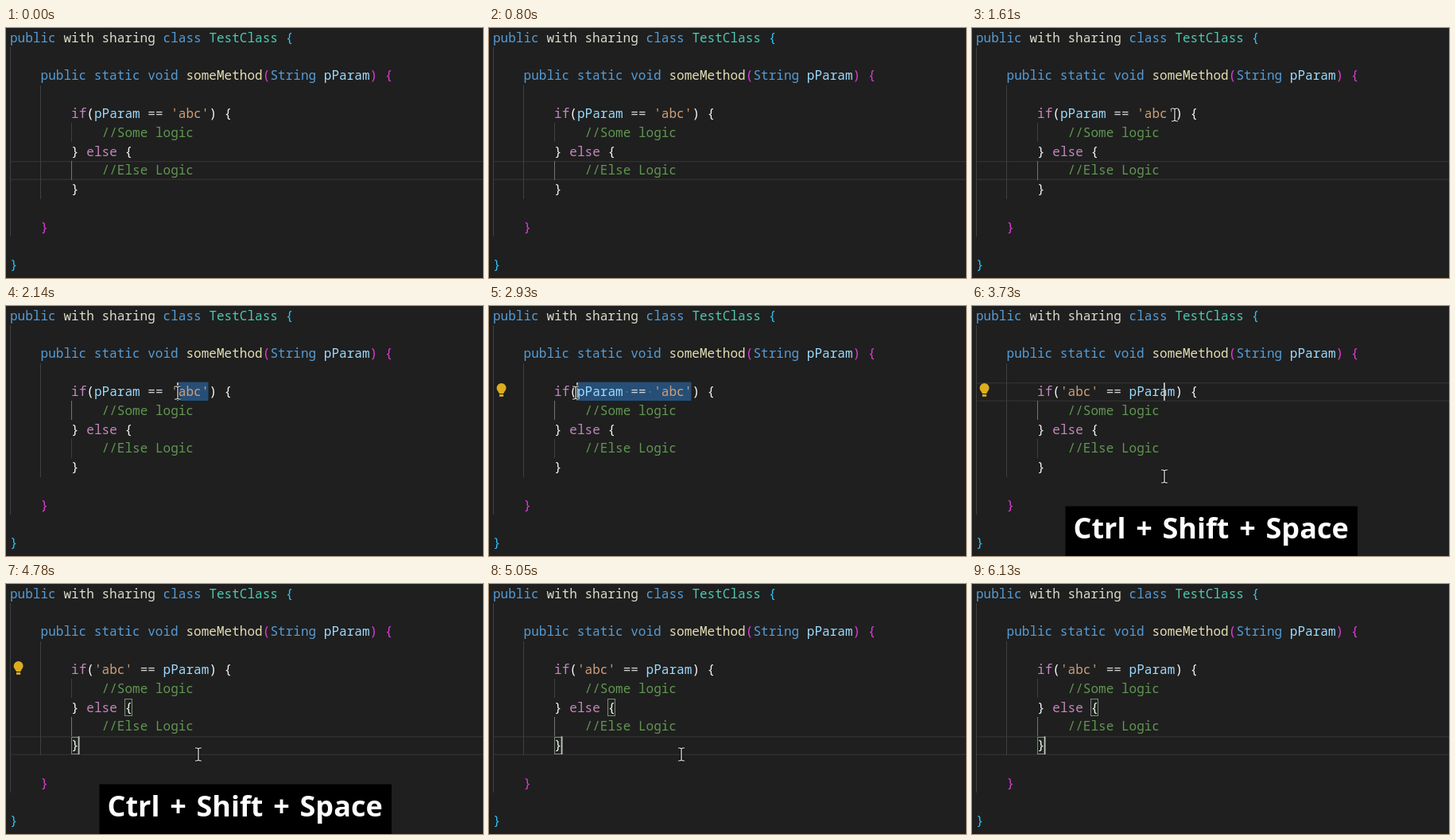
Animation, 600 px wide and 314 px high, one loop 6.33 s. Source, as an HTML page with a canvas:

```html
<!DOCTYPE html>
<html lang="en">
<head>
<meta charset="utf-8">
<title>Swapping a condition in an editor</title>
<style>
  html, body { margin: 0; width: 100%; height: 100%; overflow: hidden; background: #1f1f1f; }
  canvas { display: block; width: 600px; height: 314px; }
</style>
</head>
<body>
<canvas id="stage" width="600" height="314"></canvas>
<script>
const ctx = document.getElementById('stage').getContext('2d');

const LOOP = 6330;
const CHAR = 9.63, LEFT = 5;
const ROW = 23.8, TOP = 0.4, BASE = 17.4;
const CODE_FONT = '500 16.05px "Noto Sans Mono", "DejaVu Sans Mono", monospace';
const KEY_FONT = 'bold 36px "Open Sans", "Noto Sans", sans-serif';

const C = {
  bg: '#1f1f1f', key: '#569cd6', plain: '#dcdccc', type: '#4ec9b0', method: '#e2deb4',
  param: '#9cdcfe', text: '#ce9f78', note: '#5f9650', flow: '#c586c0', op: '#d4d4d4',
  outer: '#30c4f4', mid: '#e03cd8', inner: '#f6f6f6',
  guide: '#404040', guideOn: '#707570', line: '#2f2f2f', select: '#264f78'
};

// Each entry: row, column, then text and colour pairs.
const CODE = [
  [0, 0, 'public ', C.key, 'with sharing ', C.plain, 'class ', C.key, 'TestClass ', C.type, '{', C.outer],
  [2, 4, 'public static void ', C.key, 'someMethod', C.method, '(', C.mid, 'String ', C.key,
    'pParam', C.param, ') {', C.mid],
  [5, 12, '//Some logic', C.note],
  [6, 8, '} ', C.inner, 'else ', C.flow, '{', C.inner],
  [7, 12, '//Else Logic', C.note],
  [8, 8, '}', C.inner],
  [10, 4, '}', C.mid],
  [12, 0, '}', C.outer]
];
const BEFORE = ['pParam', C.param, ' == ', C.op, "'abc'", C.text];
const AFTER = ["'abc'", C.text, ' == ', C.op, 'pParam', C.param];

const PAREN = [[4, 10], [4, 26]];
const IF_BODY = [[4, 28], [6, 8]];
const ELSE_BODY = [[6, 15], [8, 8]];

// Full state changes; every step inherits the values it does not set.
const STEPS = [
  { at: 0, row: 7, active: 7, mouse: null, caret: null, sel: null, swapped: false,
    bulb: false, banner: false, boxes: [] },
  { at: 1340, mouse: [296, 140] },
  { at: 1610, mouse: [255, 109] },
  { at: 1870, row: 4, active: 5, caret: [4, 254.5] },
  { at: 2140, row: null, mouse: [216, 109], sel: [216, 254.5], caret: [4, 216] },
  { at: 2410, mouse: [148, 109], sel: [149, 254.5], caret: [4, 149] },
  { at: 2670, mouse: [109, 109], sel: [111, 254.5], caret: [4, 111] },
  { at: 2930, bulb: true },
  { at: 3200, swapped: true, mouse: [168, 128] },
  { at: 3460, row: 4, sel: null, mouse: [242, 176], caret: [4, 242] },
  { at: 3730, banner: true, mouse: [242, 214] },
  { at: 3990, caret: [4, colX(27)], boxes: PAREN },
  { at: 4260, caret: [4, colX(29)], boxes: IF_BODY },
  { at: 4520, row: 6, caret: [6, colX(9)], boxes: IF_BODY },
  { at: 4780, row: 8, active: 7, caret: [8, colX(9)], boxes: ELSE_BODY },
  { at: 5050, bulb: false, banner: false },
  { at: 5320, caret: null },
  { at: 5590, mouse: [498, 226] },
  { at: 5870, mouse: null, caret: [8, colX(9)] }
];

function colX(col) { return LEFT + col * CHAR; }
function rowY(row) { return TOP + row * ROW; }

function rect(x, y, w, h, color) {
  ctx.fillStyle = color;
  ctx.fillRect(x, y, w, h);
}

function write(row, col, parts) {
  for (let i = 0; i < parts.length; i += 2) {
    ctx.fillStyle = parts[i + 1];
    ctx.fillText(parts[i], colX(col), rowY(row) + BASE);
    col += parts[i].length;
  }
}

function stateAt(t) {
  return Object.assign({}, ...STEPS.filter(s => s.at <= t));
}

function guide(x, from, to, color) {
  const y = Math.round(rowY(from));
  rect(x, y, 1, Math.round(rowY(to)) - y, color);
}

function drawGuides(active) {
  guide(5, 1, 11, C.guide);
  guide(43, 3, 9, C.guide);
  for (const row of [5, 7]) guide(82, row, row + 1, row === active ? C.guideOn : C.guide);
}

function drawBox([row, col]) {
  ctx.strokeStyle = '#858585';
  ctx.lineWidth = 1;
  const x = Math.round(colX(col)) + 0.5, y = Math.round(rowY(row)) + 1.5;
  rect(x, y, 9, 21, 'rgba(0,100,0,.1)');
  ctx.strokeRect(x, y, 9, 21);
}

function drawBulb() {
  ctx.fillStyle = '#dcae1e';
  ctx.beginPath();
  ctx.arc(15.6, 103, 6, 0.8, Math.PI - 0.8, true);
  ctx.lineTo(13, 110);
  ctx.lineTo(18.2, 110);
  ctx.fill();
  rect(13, 111, 5.2, 2.8, '#dcae1e');
}

function drawMouse([x, y]) {
  const beam = new Path2D();
  for (const s of [-1, 1]) {
    beam.moveTo(x - 4, y + 8 * s);
    beam.lineTo(x - 1.5, y + 8 * s);
    beam.lineTo(x, y + 7 * s);
    beam.lineTo(x + 1.5, y + 8 * s);
    beam.lineTo(x + 4, y + 8 * s);
  }
  beam.moveTo(x, y - 7);
  beam.lineTo(x, y + 7);
  ctx.lineWidth = 3.2;
  ctx.strokeStyle = '#080808';
  ctx.stroke(beam);
  ctx.lineWidth = 1.2;
  ctx.strokeStyle = '#f2f2f2';
  ctx.stroke(beam);
}

function drawBanner() {
  rect(117.5, 251.5, 367.5, 62.5, '#000');
  ctx.font = KEY_FONT;
  ctx.wordSpacing = '3.4px';
  ctx.fillStyle = '#fff';
  ctx.fillText('Ctrl + Shift + Space', 127.5, 291.5);
  ctx.wordSpacing = '0px';
}

function drawSelection([from, to], parts) {
  rect(from, rowY(4), to - from, ROW - 0.4, C.select);
  let col = 11;
  for (const ch of parts.filter((_, i) => i % 2 === 0).join('')) {
    const x = colX(col++) + CHAR / 2;
    if (ch === ' ' && x > from) rect(x - 0.8, rowY(4) + 11.5, 1.6, 1.6, '#5f7a92');
  }
}

function draw(t) {
  const s = stateAt(t);
  const condition = s.swapped ? AFTER : BEFORE;
  rect(0, 0, 600, 314, C.bg);
  if (s.row !== null) {
    const y = Math.round(rowY(s.row));
    rect(6, y, 594, 1.5, C.line);
    rect(6, y + 22.5, 594, 1.5, C.line);
  }
  if (s.sel) drawSelection(s.sel, condition);
  drawGuides(s.active);
  s.boxes.forEach(drawBox);
  ctx.font = CODE_FONT;
  for (const [row, col, ...parts] of CODE) write(row, col, parts);
  write(4, 8, ['if', C.flow, '(', C.inner, ...condition, ') {', C.inner]);
  if (s.caret) rect(s.caret[1] - 1, rowY(s.caret[0]) + 0.6, 1.8, 22.6, '#c4c4c4');
  if (s.bulb) drawBulb();
  if (s.banner) drawBanner();
  if (s.mouse) drawMouse(s.mouse);
}

function tick() {
  draw(performance.now() % LOOP);
  requestAnimationFrame(tick);
}
tick();
</script>
</body>
</html>
```
